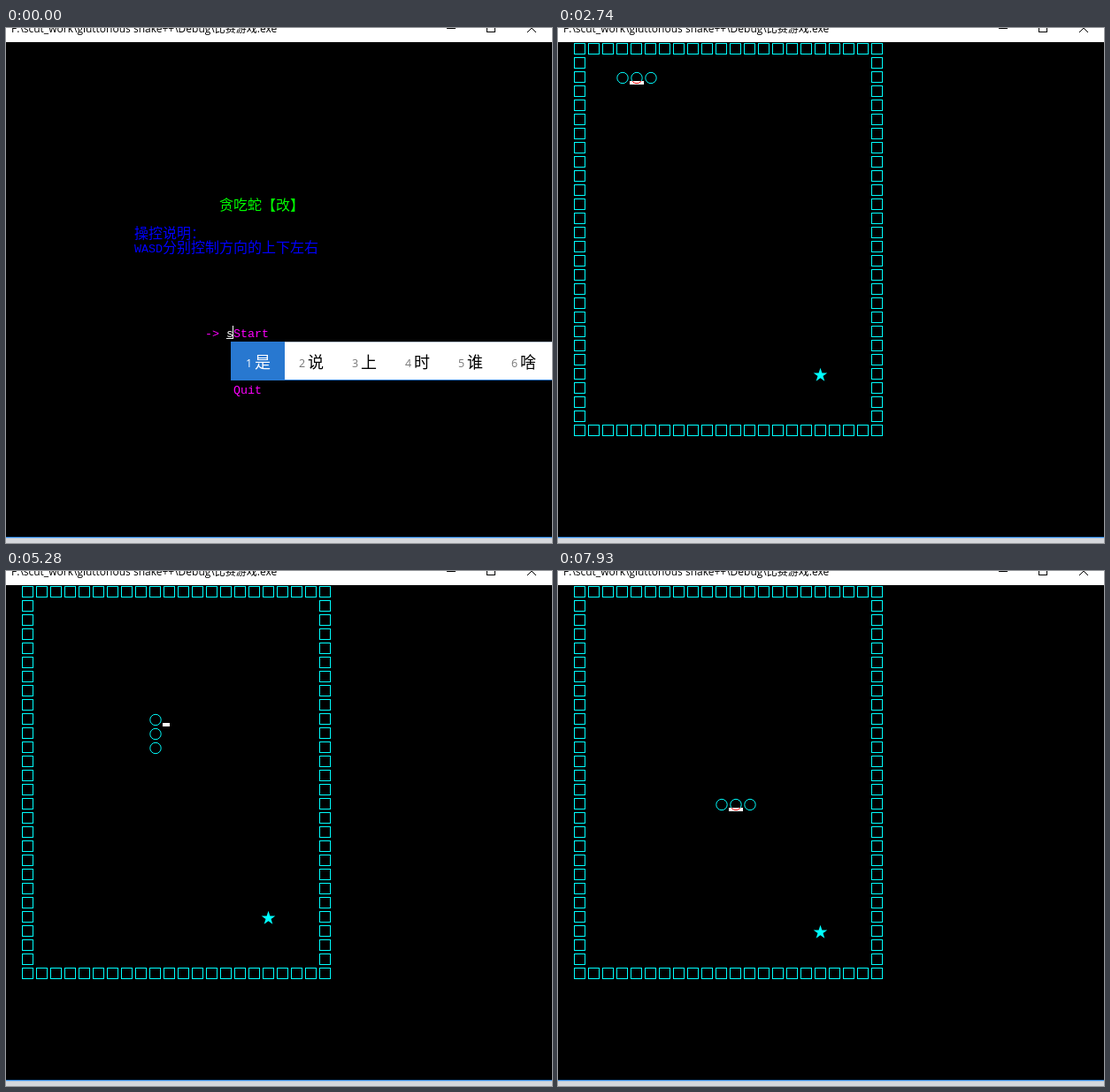
An HTML page with a canvas for the animation above (8000 ms loop, 617 by 583 pixels).

```html
<!DOCTYPE html>
<html lang="zh">
<head>
<meta charset="utf-8">
<title>贪吃蛇</title>
<style>
  html, body { margin: 0; width: 100%; height: 100%; overflow: hidden; background: #000; }
  canvas { display: block; }
</style>
</head>
<body>
<canvas id="stage" width="617" height="583"></canvas>
<script>
const ctx = document.getElementById('stage').getContext('2d');
const LOOP = 8000, GAME_START = 2740;
const CYAN = '#00ffff', MAGENTA = '#ff00ff', BLUE = '#0000ff';
const NARROW = '13.33px "Liberation Mono", monospace';
const CJK = '"Noto Sans CJK SC", "Noto Sans CJK", sans-serif';
const WIDE = '300 16px ' + CJK;

// [time, menu row, cursor shown]
const MENU = [
  [0, 20, false], [650, 22, true], [1200, 24, true], [1370, 24, false],
  [1530, 22, true], [1700, 22, false], [1860, 20, false], [2030, 20, true]
];
// times at which the snake advances one cell
const MOVES = [
  3020, 3170, 3320, 3570, 3720, 4000, 4140, 4280, 4580, 4715, 4850,
  5160, 5280, 5560, 6790, 7110, 7260, 7410, 7690, 7930
];
// [time, food row]
const FOOD = [[0, 23], [7110, 24], [7260, 25], [7410, 26], [7690, 25], [7930, 24]];

const latest = (list, t) => list.filter(e => e[0] <= t).pop();
const rowTop = row => 16 + 16 * row;

function rect(color, x, y, w, h) {
  ctx.fillStyle = color;
  ctx.fillRect(x, y, w, h);
}

function text(str, x, y, font, color) {
  ctx.font = font;
  ctx.fillStyle = color;
  ctx.fillText(str, x, y);
}

// Console text: 8 px cells, double width for CJK characters.
function print(str, x, row, color) {
  for (const ch of str) {
    const wide = ch.charCodeAt(0) > 0x2e7f;
    text(ch, x, rowTop(row) + 14, wide ? WIDE : NARROW, color);
    x += wide ? 16 : 8;
  }
}

// Inverts whatever lies beneath it.
function cursor(x, row, w = 8) {
  ctx.globalCompositeOperation = 'difference';
  rect('#fff', x, rowTop(row) + 12, w, 4);
  ctx.globalCompositeOperation = 'source-over';
}

function line(color, ...pts) {
  ctx.strokeStyle = color;
  ctx.beginPath();
  for (let i = 0; i < pts.length; i += 4) {
    ctx.moveTo(pts[i], pts[i + 1]);
    ctx.lineTo(pts[i + 2], pts[i + 3]);
  }
  ctx.stroke();
}

function drawWindow() {
  rect('#000', 0, 0, 617, 583);
  rect('#fff', 0, 0, 617, 16);
  text('F:\\scut_work\\gluttonous snake++\\Debug\\比赛游戏.exe', 6, 5,
    '12px "Open Sans", ' + CJK, '#000');
  line('#000', 498, 0.5, 508, 0.5, 589, -5, 599, 5, 589, 5, 599, -5);
  ctx.strokeRect(543.5, -4.5, 9, 9);
  rect('#2f86e0', 0, 576, 617, 1);
  rect('#a9c4e2', 0, 577, 617, 1);
  rect('#d6d8dc', 0, 578, 617, 5);
}

function drawCandidates() {
  rect('#fff', 254, 355, 363, 44);
  rect('#2b78cc', 254, 398, 363, 1);
  rect('#b8c4d0', 254, 355, 363, 1);
  rect('#2878d0', 254, 355, 61, 44);
  [...'是说上时谁啥'].forEach((ch, i) => {
    const x = 271 + 60 * i;
    text(i + 1, x, 384, '12.5px "Open Sans", sans-serif', i ? '#777' : '#fff');
    text(ch, x + 10, 385, '18px ' + CJK, i ? '#000' : '#fff');
  });
}

function drawMenu(t) {
  print('贪吃蛇【改】', 241, 11, '#00ff00');
  print('操控说明：', 145, 13, BLUE);
  print('WASD分别控制方向的上下左右', 145, 14, BLUE);
  ['Start', 'Set', 'Quit'].forEach((s, i) => print(s, 257, 20 + 2 * i, MAGENTA));

  const [, row, shown] = latest(MENU, t);
  print('->', 225, row, MAGENTA);
  if (shown) cursor(249, row);
  if (t >= 650) return;

  // pending input-method letter
  if (t < 530) rect('#fff', 249, 351, 8, 1);
  else rect('#000080', 249, 336, 8, 16);
  print('s', 249, 20, '#fff');
  rect('#fff', 256, 337, 1, 15);
  if (t < 530) drawCandidates();
}

function drawWalls() {
  ctx.strokeStyle = CYAN;
  for (let row = 0; row < 28; row++) {
    const step = row % 27 ? 21 : 1;
    for (let col = 0; col < 22; col += step) {
      ctx.strokeRect(18.5 + 16 * col, 17.5 + 16 * row, 12, 12);
    }
  }
}

function drawStar(row) {
  const cx = 296.5, cy = 393 + 16 * (row - 23);
  ctx.fillStyle = CYAN;
  ctx.beginPath();
  for (let i = 0; i < 10; i++) {
    const r = i % 2 ? 3.2 : 8.2, a = i * Math.PI / 5;
    ctx.lineTo(cx + r * Math.sin(a), cy - r * Math.cos(a));
  }
  ctx.fill();
}

// Right along row 2, down column 9, right along row 15.
const cell = n => ({
  col: n <= 4 ? 5 + n : Math.max(9, n - 8),
  row: Math.min(15, Math.max(2, n - 2))
});

function drawSnake(n) {
  ctx.strokeStyle = CYAN;
  for (let i = n - 2; i <= n; i++) {
    const { col, row } = cell(i);
    ctx.beginPath();
    ctx.arc(25 + 16 * col, 24.5 + 16 * row, 6.2, 0, 2 * Math.PI);
    ctx.stroke();
  }
}

function drawFace() {
  [['Σ', 259], ['(', 274], ['°', 281], ['o', 297], ['°', 305], ['；', 321], [')', 337]]
    .forEach(([ch, x]) => print(ch, x, 22, CYAN));
}

function drawGame(t) {
  const n = MOVES.filter(m => m <= t).length;
  drawWalls();
  drawSnake(n);
  if (t < 5830 || t >= 6240) drawStar(latest(FOOD, t)[1]);

  if (t >= 5695 && t < 6790) drawFace();
  if (t >= 6240 && t < 6790) {
    print('有蛇！！快逃！！', 209, 21, CYAN);
    cursor(337, 21);
  } else if (t >= 5695 && t < 6240) {
    cursor(345, 22);
  } else {
    const tail = cell(n - 2);
    const onBody = cell(n - 1).row === tail.row;
    cursor(33 + 16 * tail.col, tail.row, onBody ? 16 : 8);
  }
}

const start = performance.now();
function frame() {
  const t = (performance.now() - start) % LOOP;
  ctx.lineWidth = 1;
  drawWindow();
  if (t < GAME_START) drawMenu(t);
  else drawGame(t);
  requestAnimationFrame(frame);
}
frame();
</script>
</body>
</html>
```
